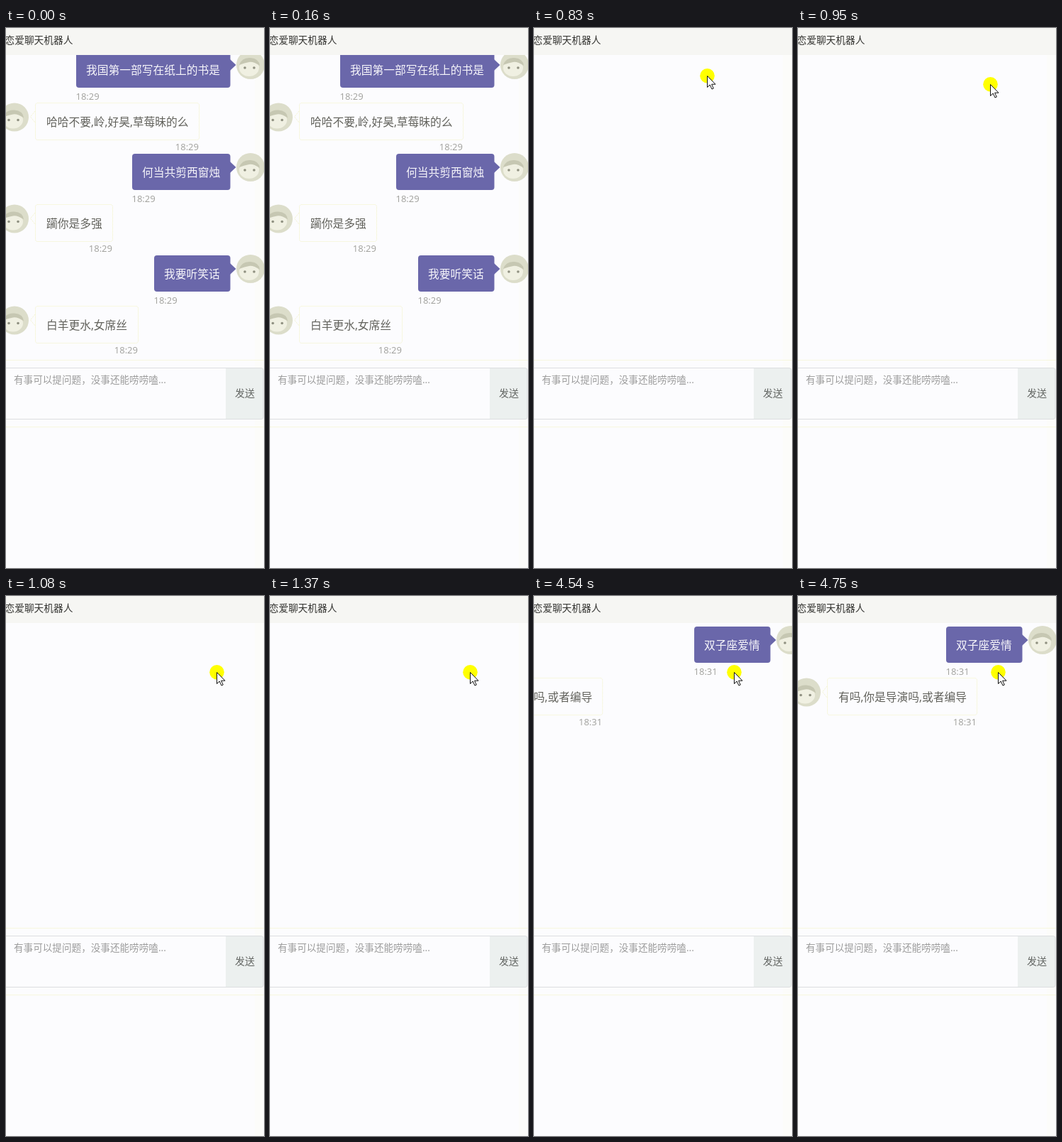
These frames come from a looping animation (364x760 px, 8 s). An HTML page:

```html
<!DOCTYPE html>
<html lang="zh">
<head>
<meta charset="utf-8">
<style>
html, body { margin: 0; width: 100%; height: 100%; overflow: hidden; background: #fcfcfe; }
svg { display: block; width: 364px; height: 760px; }
text { font: 15.75px "Open Sans", "Noto Sans CJK SC", "Noto Sans CJK", sans-serif; white-space: pre; }
.ui { font-size: 13.7px; }
.time { font-size: 13px; fill: #a0a09c; }
.dots { fill: none; stroke: #f2f2c0; stroke-dasharray: 1 1; }
</style>
</head>
<body>
<svg viewBox="0 0 364 760">
  <defs>
    <g id="avatar">
      <circle r="20" fill="#dcddca"/>
      <ellipse cx="-2" cy="4" rx="14" ry="12" fill="#f0f0e2"/>
      <path d="M-16 0Q-12-11 0-10T13 1Q4-5-2-4T-16 0" fill="#c6c7b2"/>
      <circle cx="-8" cy="4" r="1.8" fill="#8f9080"/>
      <circle cx="5" cy="4" r="1.8" fill="#8f9080"/>
    </g>
  </defs>
  <rect width="364" height="760" fill="#fcfcfe"/>
  <rect x="351" y="38" width="12" height="722" fill="#fcfcfa"/>
  <g id="old"></g>
  <g id="ask"></g>
  <g id="reply"></g>
  <rect width="364" height="38" fill="#f6f6f3"/>
  <text class="ui" x="-1.5" y="22" fill="#333330">恋爱聊天机器人</text>
  <path class="dots" d="M0 467.5H364M0 561.5H364"/>
  <path d="M310 479H360Q363 479 363 482V547Q363 550 360 550H310Z" fill="#ecf0ef"/>
  <rect x="-5" y="478.5" width="368" height="72" rx="3" fill="none" stroke="#dcdee0"/>
  <text class="ui" x="11" y="500" fill="#9c9c9c" style="font-size:13.6px">有事可以提问题，没事还能唠唠嗑...</text>
  <text class="ui" x="323" y="519" fill="#636663" style="font-size:14px">发送</text>
  <g id="cursor">
    <circle cx=".5" cy=".3" r="10.3" fill="#ff0"/>
    <path d="M.5.5V16.5L4.2 13 7 19 9.3 18 6.6 12.2H12Z" fill="#fff" stroke="#111"/>
  </g>
</svg>
<script>
const $ = id => document.getElementById(id);

const sent = (y, left, msg, time) => `
  <rect x="${left}" y="${y}" width="${316.5 - left}" height="51" rx="4" fill="#6a67aa"/>
  <path d="M316 ${y + 11}L324.5 ${y + 19}L316 ${y + 27}Z" fill="#6a67aa"/>
  <text x="${left + 14}" y="${y + 32}" fill="#f6f5fa">${msg}</text>
  <text class="time" x="${left - .5}" y="${y + 67.5}">${time}</text>
  <use href="#avatar" x="345" y="${y + 19}"/>`;

const received = (y, right, msg, time) => `
  <rect class="dots" x="41.5" y="${y - .5}" width="${right - 41}" height="52" rx="3"/>
  <path class="dots" d="M41 ${y + 11}L34.5 ${y + 19}L41 ${y + 27}"/>
  <text x="57" y="${y + 32}" fill="#62625c">${msg}</text>
  <text class="time" x="${right}" y="${y + 66}" text-anchor="end">${time}</text>
  <use href="#avatar" x="12" y="${y + 19.5}"/>`;

$('old').innerHTML =
  sent(33, 99, '我国第一部写在纸上的书是', '18:29') +
  received(106, 272, '哈哈不要,岭,好昊,草莓昧的么', '18:29') +
  sent(177, 178, '何当共剪西窗烛', '18:29') +
  received(249, 150, '躏你是多强', '18:29') +
  sent(320, 209, '我要听笑话', '18:29') +
  received(392, 186, '白羊更水,女席丝', '18:29');
$('ask').innerHTML = sent(43, 209, '双子座爱情', '18:31');
$('reply').innerHTML = received(116, 252, '有吗,你是导演吗,或者编导', '18:31');

// pointer path: time, x, y
const path = [[580, 175, -12], [780, 232, 62], [950, 271, 79], [1080, 297, 107], [1270, 297, 107], [1370, 282, 107]];

function pointer(t) {
  const i = path.findIndex(p => p[0] > t);
  if (i < 0) return path.at(-1).slice(1);
  if (i === 0) return [175, -40];
  const [a, b] = [path[i - 1], path[i]];
  const k = (t - a[0]) / (b[0] - a[0]);
  return [1, 2].map(n => Math.round(a[n] + (b[n] - a[n]) * k));
}

const easeOut = (t, start, length) => 1 - (1 - Math.min(1, Math.max(0, (t - start) / length))) ** 2;
const show = (id, on) => $(id).setAttribute('visibility', on ? 'visible' : 'hidden');
const move = (id, x, y) => $(id).setAttribute('transform', `translate(${x} ${y})`);

function draw(now) {
  const t = now % 8000;
  show('old', t < 500);
  show('ask', t >= 4410);
  show('reply', t >= 4500);
  move('ask', 39 * (1 - easeOut(t, 4480, 180)), 0);
  move('reply', -260 * (1 - easeOut(t, 4480, 270)), 0);
  move('cursor', ...pointer(t));
  requestAnimationFrame(draw);
}
draw(0);
</script>
</body>
</html>
```
